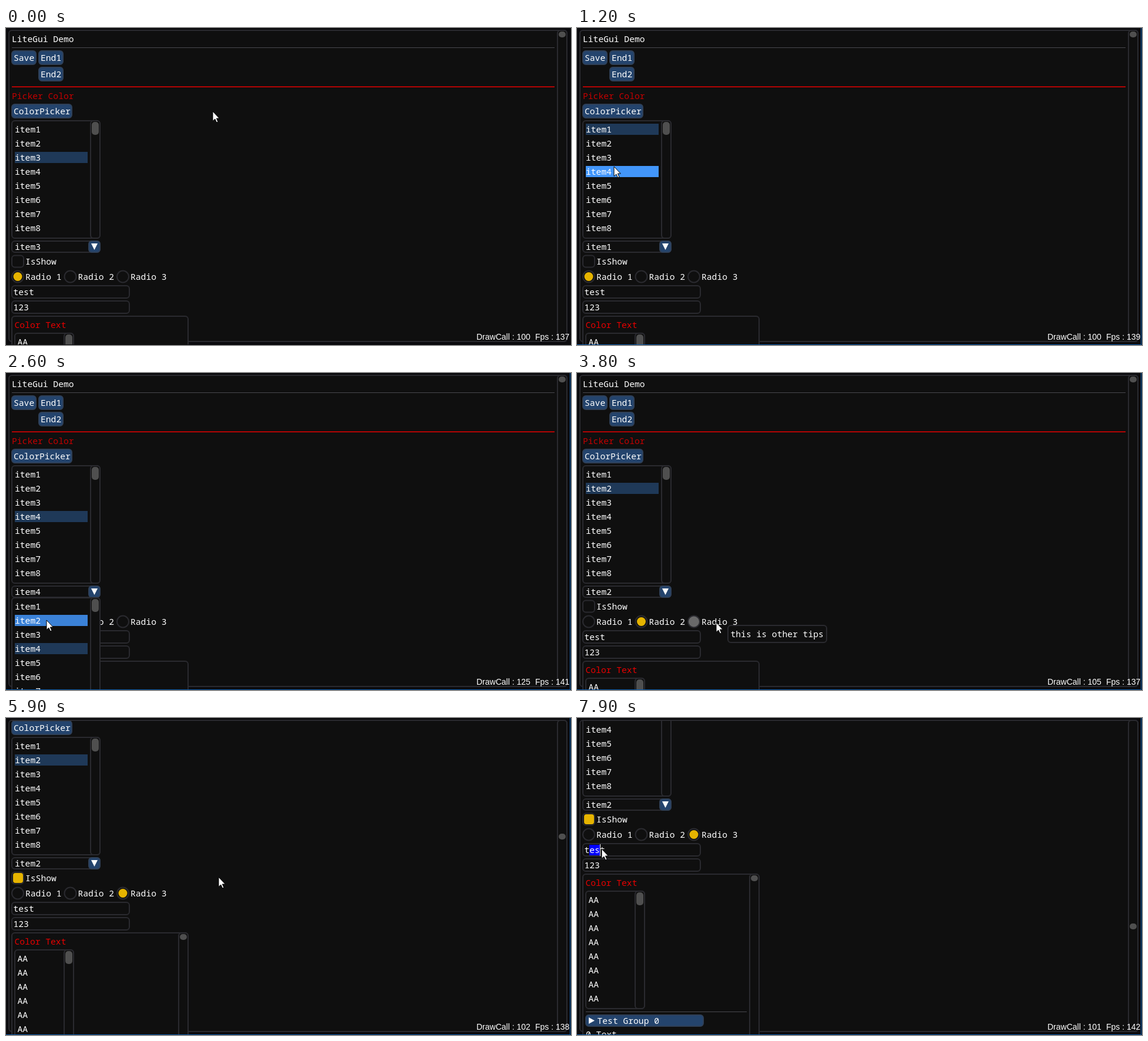
Animation of 962x540 px, one loop 8 s. Source, as an HTML page with a canvas:

```html
<!DOCTYPE html>
<html lang="en">
<head>
<meta charset="utf-8">
<title>LiteGui Demo</title>
<style>
  html, body { margin: 0; width: 100%; height: 100%; overflow: hidden; background: #0b0b0e; }
  canvas { display: block; }
</style>
</head>
<body>
<canvas id="stage" width="962" height="540"></canvas>
<script>
const ctx = document.getElementById('stage').getContext('2d');
const LOOP = 8000, TICK = 100, GLIDE = 500, PRESS = 100, NOTCH = 25, ROW = 24;
const MONO = '14.66px "Noto Sans Mono", "DejaVu Sans Mono", monospace';
const SANS = '14px "Liberation Sans", Arial, sans-serif';
const BG = '#0f0f0f', EDGE = '#2a2a2f', GRIP = '#4f4f4f', BLUE = '#24446d', BLUE_EDGE = '#2f4058',
      PICKED = '#1f3958', HOVER = '#4296fa', YELLOW = '#e6b400', GREY = '#696969';

// Where the pointer arrives, and what its click there changes
const stops = [
  { at: 0, x: 352, y: 142 },
  { at: 800, x: 70, y: 171, set: { picked: 1 } },
  { at: 1200, x: 63, y: 236, set: { picked: 4 } },
  { at: 1800, x: 147, y: 367, set: { open: true } },
  { at: 2600, x: 69, y: 421, set: { open: false, picked: 2 } },
  { at: 3300, x: 140, y: 420, set: { radio: 1 } },
  { at: 3800, x: 237, y: 425, set: { radio: 2 } },
  { at: 4400, x: 62, y: 338 },
  { at: 5100, x: 54, y: 393, set: { checked: true } },
  { at: 5800, x: 362, y: 271 },
  { at: 6900, x: 46, y: 223 },
  { at: 7300, x: 22, y: 222, set: { typing: true } },
  { at: 7900, x: 42, y: 223 }
];

const clamp = (v, lo, hi) => Math.max(lo, Math.min(hi, v));
const ease = k => k * k * (3 - 2 * k);

function pointerAt(t) {
  const i = stops.findLastIndex(s => s.at <= t);
  const a = stops[i], b = stops[i + 1] || a;
  const from = Math.max(a.at + PRESS, b.at - GLIDE);
  const k = b === a ? 0 : ease(clamp((t - from) / (b.at - from), 0, 1));
  return [Math.round(a.x + (b.x - a.x) * k), Math.round(a.y + (b.y - a.y) * k)];
}

function stateAt(t) {
  const state = { picked: 3, radio: 0, open: false, checked: false, typing: false };
  for (const s of stops) if (t >= s.at + PRESS) Object.assign(state, s.set);
  return state;
}

const scrollAt = t => clamp((t - 5400) / TICK, 0, 9) * NOTCH;

function fpsAt(t) {
  const r = Math.sin(t * 12.9898) * 43758.5453;
  return 137 + Math.floor((r - Math.floor(r)) * 9);
}

// Text is placed by the vertical middle of its capitals.
function text(s, x, mid, color = '#fff', font = MONO) {
  ctx.font = font;
  ctx.fillStyle = color;
  ctx.fillText(s, x, mid + 5);
}

function rect(x, y, w, h, color) {
  ctx.fillStyle = color;
  ctx.fillRect(x, y, w, h);
}

function paint(fill, edge, width = 2) {
  if (fill) { ctx.fillStyle = fill; ctx.fill(); }
  if (edge) { ctx.strokeStyle = edge; ctx.lineWidth = width; ctx.stroke(); }
}

function box(x, y, w, h, fill = BG, edge = EDGE, r = 5) {
  ctx.beginPath();
  ctx.roundRect(x, y, w, h, r);
  paint(fill, edge);
}

function poly(points, fill, edge) {
  ctx.beginPath();
  points.forEach(([x, y]) => ctx.lineTo(x, y));
  ctx.closePath();
  paint(fill, edge, 1);
}

function disc(x, y, r, fill, edge) {
  ctx.beginPath();
  ctx.arc(x, y, r, 0, 7);
  paint(fill, edge);
}

const grip = (x, y, h) => box(x, y, 12, h, GRIP, null);

function button(label, x, y, w) {
  box(x, y, w, 23, BLUE, BLUE_EDGE);
  text(label, x + 3, y + 11.5);
}

function scrollList(x, y, w) {
  box(x, y, w, 200);
  box(x + w - 16, y, 16, 200);
  grip(x + w - 14, y + 2, 22);
}

function items(top, s, active, hoverColor) {
  scrollList(10, top, 150);
  for (let i = 1; i <= 8; i++) {
    const y = top + 5 + (i - 1) * ROW;
    const over = active && s.x >= 15 && s.x < 139 && s.y >= y && s.y < y + 19;
    if (over || i === s.picked) rect(15, y, 124, 19, over ? hoverColor : PICKED);
    text('item' + i, 15, y + 9.5);
  }
}

function content(s) {
  const over = (x, y, w, h) => !s.open && s.x > x && s.x < x + w && s.y > y && s.y < y + h;

  text('LiteGui Demo', 10, 18.5);
  rect(10, 33, 924, 1, '#48484e');
  button('Save', 10, 39, 41);
  button('End1', 56, 39, 41);
  button('End2', 56, 67, 41);
  rect(10, 99.5, 924, 1.5, '#e80000');
  text('Picker Color', 10, 115.5, '#c40000');
  button('ColorPicker', 10, 130, 102);
  items(158, s, !s.open, HOVER);

  box(10, 363, 150, 19);
  box(141, 363, 19, 19, over(141, 363, 19, 19) ? HOVER : BLUE, BLUE_EDGE);
  poly([[145, 367], [156, 367], [150.5, 378]], '#fff');
  text('item' + s.picked, 15, 372.5);

  box(10, 387.5, 20, 20, !s.checked && over(10, 388, 76, 20) ? GREY : BG);
  if (s.checked) box(12, 389, 17, 17, YELLOW, null, 4);
  text('IsShow', 33, 397.5);

  for (let i = 0; i < 3; i++) {
    const x = 20 + i * 89.5;
    disc(x, 423.5, 10, over(x - 10, 413, 84, 20) ? GREY : BG, EDGE);
    if (i === s.radio) disc(x, 423.5, 7.5, YELLOW);
    text('Radio ' + (i + 1), x + 13, 423.5);
  }

  box(10, 439, 200, 21);
  const chars = s.typing ? clamp(Math.round((s.x - 22) / 8.8), 0, 2) : 0;
  rect(21, 441, chars * 9, 18, '#00f');
  text('test', 12.5, 450);
  if (s.typing) rect(21 + chars * 9, 440, 1, 20, '#fff');
  box(10, 465, 200, 21);
  text('123', 12.5, 475.5);

  box(10, 491, 300, 300);
  if (s.checked) {
    box(294, 491, 16, 300);
    grip(296, 493, 10);
  }
  text('Color Text', 14.5, 505.5, '#e60000');
  scrollList(15, 520, 100);
  for (let i = 0; i < 8; i++) text('AA', 19.5, 534.5 + i * ROW);
  rect(15, 725, 274, 1, '#48484e');
  box(15, 731, 200, 19, BLUE, BLUE_EDGE);
  poly([[20, 735], [30, 740.5], [20, 746]], '#fff');
  text('Test Group 0', 34.5, 740.5);
  text('0 Text', 15, 763.5);

  if (s.open) items(383, s, true, '#3b82d8');
}

function draw(now) {
  let t = Math.floor((now % LOOP) / TICK) * TICK;
  if (t === 2700 || t === 7000) t -= TICK;  // the picture rests here

  const [x, y] = pointerAt(t);
  const scroll = scrollAt(t);
  const s = { ...stateAt(t), x, y: y + scroll };
  const tip = s.radio > 0 && x > 189 && x < 273 && s.y > 413 && s.y < 433;

  rect(0, 0, 962, 540, '#0b0b0e');
  box(5, 4, 950, 530);
  box(939, 4, 16, 530);
  grip(941, Math.round(6 + scroll * 1.53), 10);

  ctx.save();
  ctx.beginPath();
  ctx.rect(6, 5, 932, 534);
  ctx.clip();
  ctx.translate(0, -scroll);
  content(s);
  ctx.restore();

  if (tip) {
    box(x + 20, y + 5, 168, 29);
    text('this is other tips', x + 24.5, y + 19.5);
  }

  const pickedGone = scroll > 158 + s.picked * ROW;
  const calls = 100 + 25 * s.open + 5 * tip + 2 * s.checked - pickedGone;
  text('DrawCall : ' + calls, 801, 525.5, '#fff', SANS);
  text('Fps : ' + fpsAt(t), 901, 525.5, '#fff', SANS);
  if (t > 0) {
    rect(960, 0, 1, 540, '#0b5cad');
    rect(0, 539, 961, 1, '#0b5cad');
  }

  const arrow = [[0, 0], [0, 16.5], [3.8, 13], [6.6, 19], [9, 18], [6.4, 12], [11.3, 12]];
  poly(arrow.map(([dx, dy]) => [x + dx, y + dy]), '#fff', '#000');
}

const start = performance.now();
function loop() {
  draw(performance.now() - start);
  requestAnimationFrame(loop);
}
loop();
</script>
</body>
</html>
```
